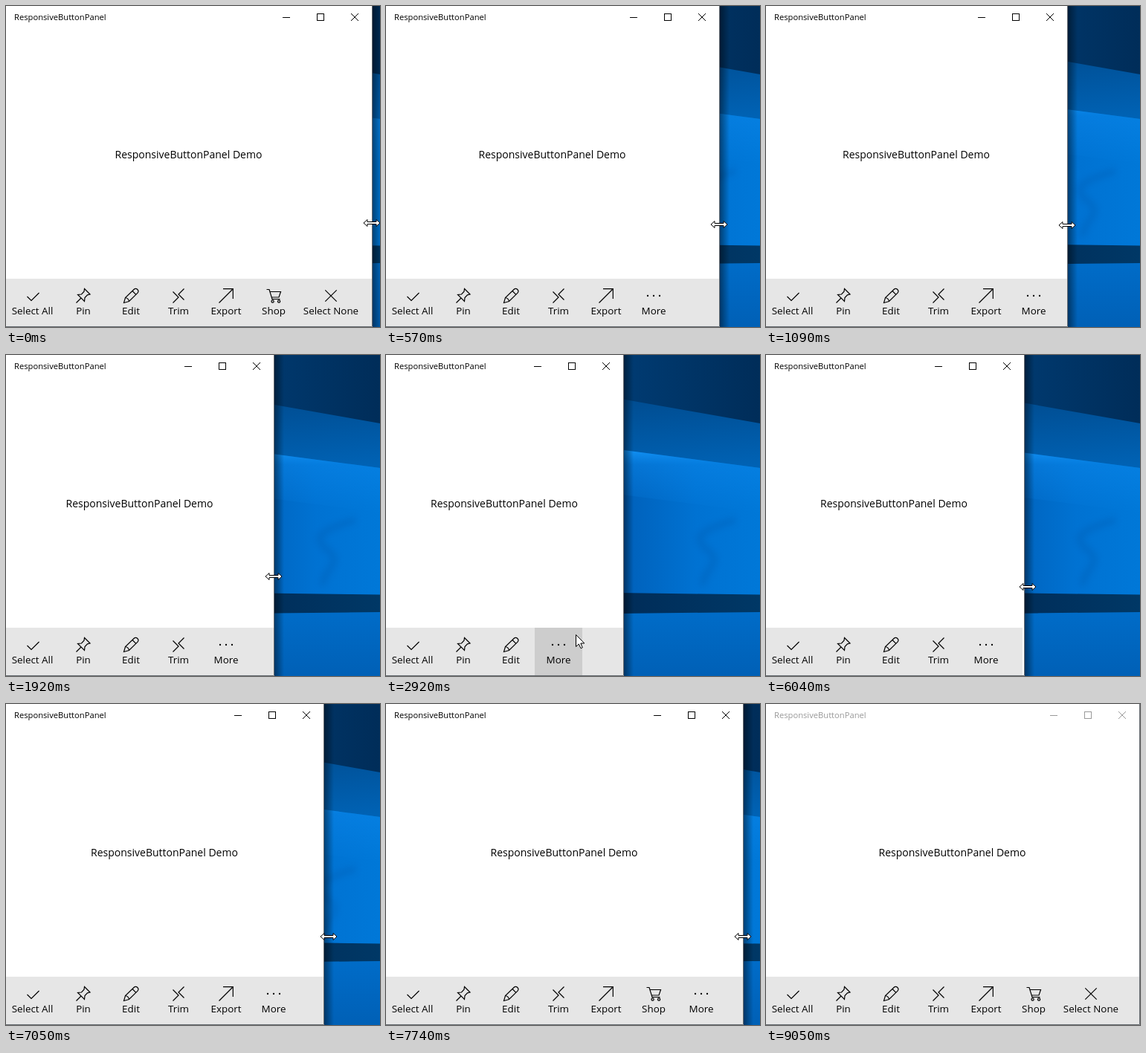
These frames come from a looping animation (503x432 px, 9150 ms). An HTML page:

```html
<!DOCTYPE html>
<html lang="en">
<head>
<meta charset="utf-8">
<title>ResponsiveButtonPanel</title>
<style>
  html, body { margin: 0; width: 100%; height: 100%; overflow: hidden; background: #fff; }
  svg { display: block; font-family: "Open Sans", "Noto Sans", sans-serif; }
  .line { fill: none; stroke: #000; stroke-width: 1.2; }
  .label { font-size: 13.4px; text-anchor: middle; }
  .item { font-size: 14.2px; }
</style>
</head>
<body>
<svg width="503" height="432" viewBox="0 0 503 432">
  <defs>
    <linearGradient id="sky"><stop stop-color="#003c74"/><stop offset="1" stop-color="#002d59"/></linearGradient>
    <linearGradient id="haze" x2=".15" y2="1"><stop stop-color="#004c90"/><stop offset="1" stop-color="#0062b4"/></linearGradient>
    <linearGradient id="pane"><stop stop-color="#005fb8"/><stop offset=".55" stop-color="#0072d2"/><stop offset="1" stop-color="#0078d8"/></linearGradient>
    <linearGradient id="glow" x2="0" y2="1"><stop stop-color="#1496fa" stop-opacity=".95"/><stop offset=".25" stop-color="#0a86ea" stop-opacity=".5"/><stop offset="1" stop-color="#0a86ea" stop-opacity="0"/></linearGradient>
    <linearGradient id="low" x2="0" y2="1"><stop stop-color="#006cc8"/><stop offset="1" stop-color="#0060b6"/></linearGradient>
    <linearGradient id="band"><stop stop-color="#002c58"/><stop offset="1" stop-color="#003866"/></linearGradient>
    <linearGradient id="shade"><stop stop-opacity=".45"/><stop offset="1" stop-opacity="0"/></linearGradient>
    <filter id="soft" x="-50%" y="-50%" width="200%" height="200%"><feGaussianBlur stdDeviation="4"/></filter>
    <clipPath id="menuClip"><rect id="menuMask" x="179" width="106"/></clipPath>
  </defs>

  <g id="wallpaper">
    <rect x="310" width="193" height="432" fill="url(#sky)"/>
    <path d="M310 58 503 92V160L310 130Z" fill="url(#haze)"/>
    <path d="M310 126.7 503 152V432H310Z" fill="url(#pane)"/>
    <path d="M310 126.7 503 152V212L310 187Z" fill="url(#glow)"/>
    <path d="M470 222C425 235 410 245 432 262S430 285 425 310" fill="none" stroke="#0058ac" stroke-width="9" opacity=".3" filter="url(#soft)"/>
    <rect x="310" y="346" width="193" height="86" fill="url(#low)"/>
    <path d="M310 320 503 322.5V346L310 348Z" fill="url(#band)"/>
  </g>

  <rect id="shadow" width="13" height="432" fill="url(#shade)"/>
  <rect id="page" height="432" fill="#fff"/>
  <text id="title" x="11" y="19" font-size="11.2">ResponsiveButtonPanel</text>
  <g id="caption" fill="none" shape-rendering="crispEdges">
    <path d="M-121 15.5h10M-74.5 10.5h9v9h-9z"/>
    <path d="M-29 10l10 10m0-10l-10 10" shape-rendering="auto"/>
  </g>
  <text id="demo" y="205" font-size="14" text-anchor="middle">ResponsiveButtonPanel Demo</text>
  <rect id="bar" y="367" height="64" fill="#e6e6e6"/>
  <g id="buttons"></g>
  <path id="frame" fill="none" stroke="#666b70"/>
  <g id="menu" clip-path="url(#menuClip)">
    <rect x="179.5" y="217.5" width="105" height="145" fill="#f1f1f1" stroke="#ccc"/>
    <g id="items"></g>
  </g>
  <g stroke="#000" fill="#fff">
    <path id="resize" d="M-11 0-6-4.5V-1.5H6V-4.5L11 0 6 4.5V1.5H-6V4.5Z"/>
    <path id="arrow" d="M.5.5V16.5L4.3 13 7 18.7 9.3 17.7 6.8 12H11.8Z"/>
  </g>
</svg>
<script>
const LOOP = 9150, MORE_WIDTH = 64;
const $ = id => document.getElementById(id);
const set = (id, attrs) => { for (const k in attrs) $(id).setAttribute(k, attrs[k]); };
const show = (id, on) => { $(id).style.display = on ? '' : 'none'; };

// Icon paths are relative to the centre of the button glyph.
const commands = [
  ['Select All', 71, 'M-7 1-1.5 6.5 9-4'],
  ['Pin', 64, 'M1.5-9.5 9-2 5.5-1.2 2 2.5 1.5 7.5-7.5-1.5-2.5-2 1-5.8ZM-3 3-9.5 9.5'],
  ['Edit', 64, 'M-9.5 9.5-7.5 2.5 4-8.5A3.3 3.3 0 0 1 8.8-3.7L-2.5 7.5ZM-7.5 2.5Q-3.2 3.2-2.5 7.5M2-6.5 6.8-1.7'],
  ['Trim', 64, 'M7.5-9.5 0-2 7.5 5.5M-7.5-5.5 0 2-7.5 9.5'],
  ['Export', 64, 'M-9.5 9.5 9-9M-4-9.3H9.3V4'],
  ['Shop', 64, 'M-9.5-8.5H-6L-2 4.5H8.5M-5.2-5.5H9.5L7 2H-2.8M-3 7.5a1.6 1.6 0 1 0 3.2 0a1.6 1.6 0 1 0-3.2 0M5.5 7.5a1.6 1.6 0 1 0 3.2 0a1.6 1.6 0 1 0-3.2 0'],
  ['Select None', 90, 'M-7.7-7.7 7.7 7.7M7.7-7.7-7.7 7.7']
];
const dots = [-8, 0, 8].map(x => `<circle cx="${x}" r="1.15"/>`).join('');
const button = (id, x, label, icon) => `<g id="${id}">
  <g transform="translate(${x} 390)">${icon}</g>
  <text class="label" x="${x}" y="415">${label}</text></g>`;

let edge = 0;
const ends = [];
$('buttons').innerHTML = commands.map(([label, width, d], i) => {
  const x = edge + width / 2;
  ends.push(edge += width + (i ? 0 : 1));
  return button('cmd' + i, x, label, `<path class="line" d="${d}"/>`);
}).join('') + `<g id="more"><rect id="hover" x="-32" y="367" width="64" height="64" fill="#cdcdcd"/>
  ${button('moreFace', 0, 'More', dots)}</g>`;
$('items').innerHTML = commands.slice(3)
  .map(([label], i) => `<text class="item" x="191.5" y="${247 + 32 * i}">${label}</text>`).join('');

// [first, last, count] of the moments at which the picture updates
const steps = [
  [0, 0, 1], [150, 1090, 8], [1240, 1240, 1], [1640, 2680, 8], [2800, 2920, 2],
  [3060, 3760, 6], [3890, 3890, 1], [4290, 4440, 2], [4720, 4960, 3], [5370, 5370, 1],
  [5640, 6580, 8], [6740, 6740, 1], [7050, 8010, 8], [8380, 8770, 4], [9050, 9050, 1]
].flatMap(([a, b, n]) => Array.from({ length: n }, (_, i) =>
  Math.floor((a + (n > 1 ? (b - a) * i / (n - 1) : 0)) / 10) * 10));

const widths = [
  [0, 493], [1090, 406], [1240, 387], [1500, 387], [2230, 320], [5500, 320],
  [6040, 348], [6580, 416], [6740, 424], [7050, 428], [8010, 503]
];
// [time, x, y, cursor]
const pointer = [
  [0, 492, 292, 'resize'], [1090, 405, 295, 'resize'], [1240, 386, 296, 'resize'],
  [1500, 386, 296, 'resize'], [2230, 319, 300, 'resize'], [2380, 300, 322, 'arrow'],
  [2680, 266, 368, 'arrow'], [2800, 257, 376, 'arrow'], [2920, 255, 376, 'arrow'],
  [3200, 255, 376, 'arrow'], [3760, 276, 360, 'arrow'], [4200, 276, 360, 'arrow'],
  [4290, 305, 341, 'arrow'], [4440, 334, 312, 'arrow'], [4840, 327, 311, 'arrow'],
  [4960, 324, 312, 'resize'], [5500, 324, 312, 'resize'], [6040, 352, 312, 'resize'],
  [6580, 420, 313, 'resize'], [6740, 428, 313, 'resize'], [7050, 434, 313, 'resize'],
  [8010, 499, 313, 'resize'], [8380, 496, 330, 'arrow'], [8640, 490, 405, 'arrow'],
  [8770, 488, 432, 'none']
];

const rowAt = (keys, t) => keys.findLastIndex(k => k[0] <= t);
function tween(keys, t, col = 1) {
  const i = rowAt(keys, t), a = keys[i], b = keys[i + 1];
  return Math.round(b ? a[col] + (b[col] - a[col]) * (t - a[0]) / (b[0] - a[0]) : a[col]);
}

function drawWindow(t) {
  const w = tween(widths, t);
  const lag = t >= 5640 && t <= 6580 ? 2 : 0;
  const inner = w - 1 - lag;
  const ink = t >= 9050 ? '#999' : '#000';
  set('shadow', { x: w });
  set('page', { width: w });
  set('title', { fill: ink });
  set('caption', { transform: `translate(${w} 0)`, stroke: ink });
  set('demo', { x: inner / 2 - 0.5 });
  set('bar', { width: inner });
  set('frame', { d: `M${w - 0.5} 0V431.5H0` });

  const all = ends.at(-1) <= w;
  const count = all ? ends.length : ends.filter(x => x + MORE_WIDTH <= w).length;
  commands.forEach((_, i) => show('cmd' + i, i < count));
  show('more', !all);
  set('more', { transform: `translate(${ends[count - 1] + 32} 0)` });
  show('hover', t >= 2800 && t < 4290);
}

function drawMenu(t) {
  const p = Math.min(1, Math.max(0, (t - 3400) / 490));
  const grown = 1 - (1 - p) ** 3;
  const height = 146 * grown;
  show('menu', p > 0 && t < 5640);
  set('menu', { opacity: Math.min(1, 0.4 + grown * 0.6) });
  set('menuMask', { y: 363 - height, height });
}

function drawPointer(t) {
  const kind = pointer[rowAt(pointer, t)][3];
  const transform = `translate(${tween(pointer, t, 1)} ${tween(pointer, t, 2)})`;
  for (const id of ['resize', 'arrow']) {
    show(id, id === kind);
    set(id, { transform });
  }
}

function tick() {
  const now = performance.now() % LOOP;
  const t = steps.findLast(s => s <= now);
  drawWindow(t);
  drawMenu(t);
  drawPointer(t);
  requestAnimationFrame(tick);
}
tick();
</script>
</body>
</html>
```
